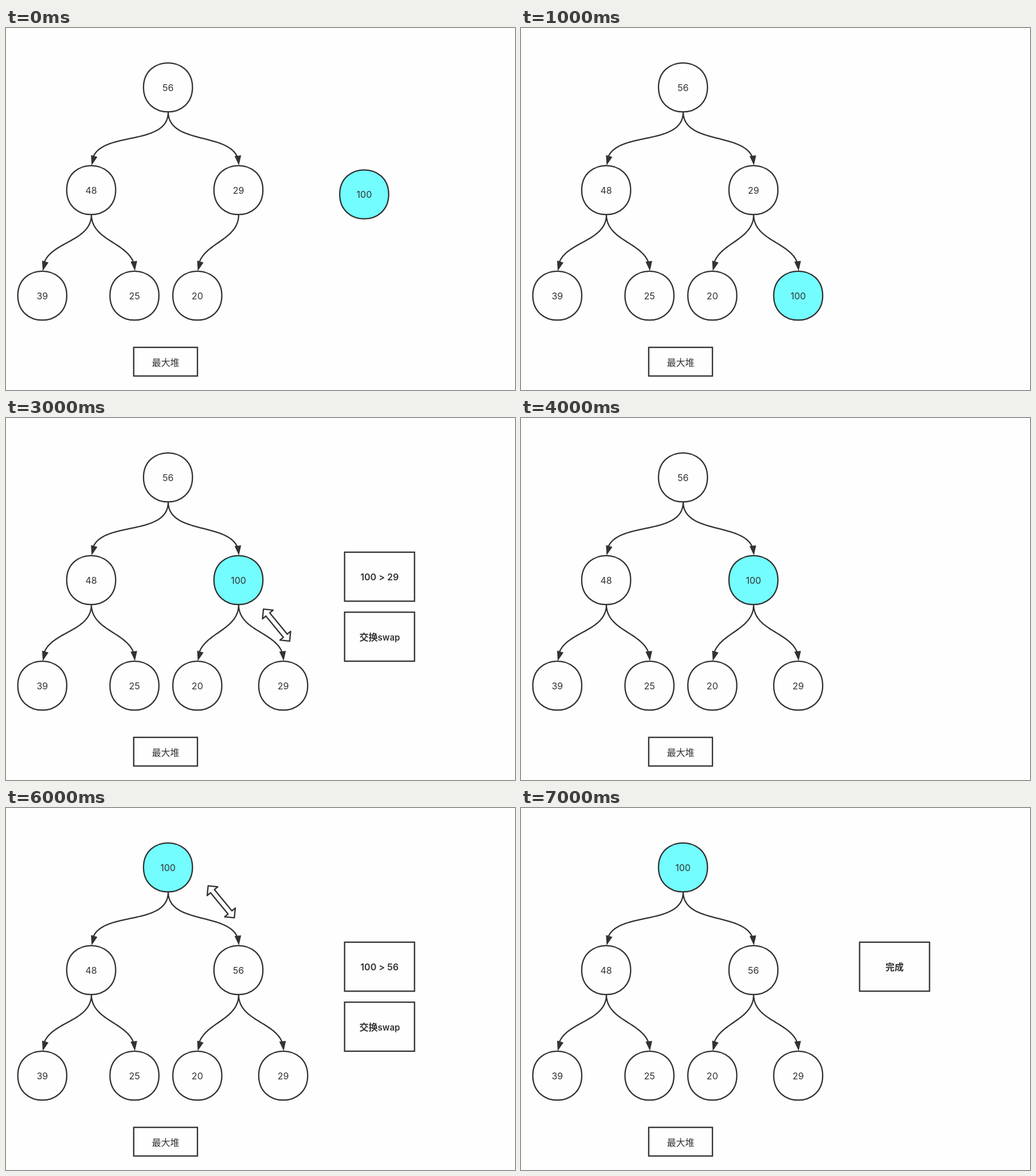
An HTML page with a canvas for the animation above (8 s loop, 888 by 631 pixels).

```html
<!DOCTYPE html>
<html lang="zh-CN">
<head>
<meta charset="utf-8">
<title>最大堆</title>
<style>
html, body { margin: 0; width: 100%; height: 100%; overflow: hidden; background: #fefefe; }
canvas { display: block; }
</style>
</head>
<body>
<canvas id="stage" width="888" height="631"></canvas>
<script>
const ctx = document.getElementById('stage').getContext('2d');
const INK = '#323232', PAPER = '#fefefe', HOT = '#73fdff';
const LATIN = 'Inter, sans-serif';
const HAN = '"Noto Sans CJK SC", "Noto Sans CJK", sans-serif';
const R = 42.7, STEP = 1000;

// Heap slots in level order; the last one is the waiting place outside the tree.
const SLOTS = [
  [282.6, 103.5], [148.6, 282.5], [405.5, 282.5],
  [63.3, 466.5], [224.1, 466.5], [333.8, 466.5], [483.6, 466.5],
  [624.9, 290]
];
const LOW_SWAP = [472, 361], HIGH_SWAP = [375.5, 163.5];

const START = [56, 48, 29, 39, 25, 20, null, 100];
const INSERTED = [56, 48, 29, 39, 25, 20, 100];
const RAISED = [56, 48, 100, 39, 25, 20, 29];
const DONE = [100, 48, 56, 39, 25, 20, 29];

const STEPS = [
  { heap: START },
  { heap: INSERTED },
  { heap: INSERTED, swap: LOW_SWAP, test: '100 > 29' },
  { heap: RAISED, swap: LOW_SWAP, test: '100 > 29' },
  { heap: RAISED },
  { heap: RAISED, swap: HIGH_SWAP, test: '100 > 56' },
  { heap: DONE, swap: HIGH_SWAP, test: '100 > 56' },
  { heap: DONE, done: true }
];

function text(str, x, y, font, align = 'center') {
  ctx.font = font;
  ctx.textAlign = align;
  ctx.fillStyle = INK;
  ctx.fillText(str, x, y);
}

function box(x, y, w, h) {
  ctx.lineJoin = 'miter';
  ctx.strokeRect(x, y, w, h);
}

// Two cubic halves give the slightly squarish circle.
function node([x, y], value) {
  const k = R * 4 / 3;
  ctx.beginPath();
  ctx.moveTo(x - R, y);
  ctx.bezierCurveTo(x - R, y - k, x + R, y - k, x + R, y);
  ctx.bezierCurveTo(x + R, y + k, x - R, y + k, x - R, y);
  ctx.closePath();
  ctx.fillStyle = value === 100 ? HOT : PAPER;
  ctx.fill();
  ctx.stroke();
  text(value, x, y + 6.3, '400 16px ' + LATIN);
}

function edge(from, to) {
  const x0 = from[0] + 0.4, y0 = from[1] + R;
  const x1 = to[0] + 0.8, y1 = to[1] - R - 0.6;
  const d = Math.hypot(x1 - x0, y1 - y0) * 0.4;
  ctx.beginPath();
  for (let i = 0; i <= 46; i++) {
    const t = i / 50, u = 1 - t;
    const a = u * u * (u + 3 * t), b = t * t * (t + 3 * u);
    ctx.lineTo(x0 * a + x1 * b,
      y0 * a + y1 * b + 3 * t * u * d * (u - t));
  }
  ctx.stroke();

  ctx.save();
  ctx.translate(x1, y1);
  ctx.rotate(x1 < x0 ? 0.27 : -0.11);
  ctx.beginPath();
  ctx.moveTo(0, 0.3);
  ctx.lineTo(-5.8, -16.7);
  ctx.lineTo(5.8, -16.7);
  ctx.closePath();
  ctx.fillStyle = INK;
  ctx.fill();
  ctx.restore();
}

function doubleArrow([x, y]) {
  const tip = 36, neck = 24, wide = 12, thin = 4.4;
  const half = [[-neck, -thin], [-neck, -wide], [-tip, 0], [-neck, wide], [-neck, thin]];
  ctx.save();
  ctx.translate(x, y);
  ctx.rotate(0.883);
  ctx.beginPath();
  half.forEach(([px, py]) => ctx.lineTo(px, py));
  half.forEach(([px, py]) => ctx.lineTo(-px, -py));
  ctx.closePath();
  ctx.fillStyle = PAPER;
  ctx.fill();
  ctx.lineJoin = 'round';
  ctx.stroke();
  ctx.restore();
}

function draw({ heap, swap, test, done }) {
  ctx.fillStyle = PAPER;
  ctx.fillRect(0, 0, 888, 631);
  ctx.strokeStyle = INK;
  ctx.lineWidth = 2.3;

  heap.forEach((value, i) => {
    if (value === null) return;
    if (i > 0 && i < 7) edge(SLOTS[(i - 1) >> 1], SLOTS[i]);
  });
  heap.forEach((value, i) => {
    if (value !== null) node(SLOTS[i], value);
  });

  box(222.8, 556.7, 111.2, 49.9);
  text('最大堆', 278.4, 588.8, '400 16px ' + HAN);

  if (swap) doubleArrow(swap);
  if (test || done) box(590.7, 233.9, 122, 85.4);
  if (test) {
    text(test, 651.7, 282.8, '600 16px ' + LATIN);
    box(590.7, 338.5, 122, 85.4);
    text('交换', 616.5, 387.9, '700 16px ' + HAN, 'left');
    text('swap', 648.6, 387.6, '600 15px ' + LATIN, 'left');
  }
  if (done) text('完成', 651.7, 282.9, '700 16px ' + HAN);
}

const begin = performance.now();
function tick() {
  const t = Math.max(0, performance.now() - begin);
  draw(STEPS[Math.floor(t / STEP) % STEPS.length]);
  requestAnimationFrame(tick);
}
tick();
</script>
</body>
</html>
```
